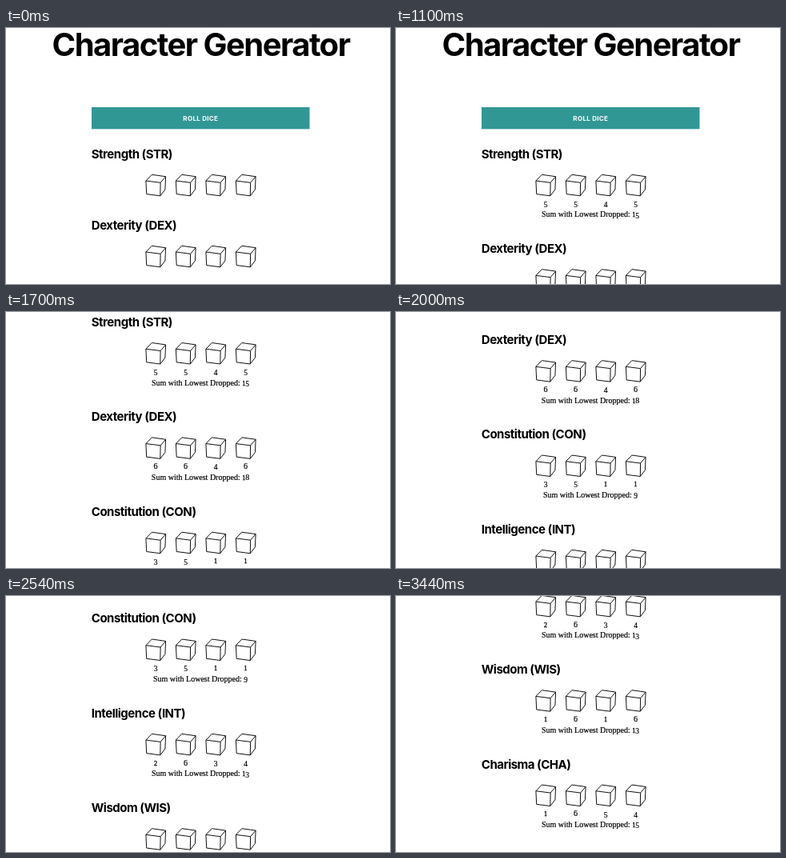
These frames come from a looping animation (480 by 320 pixels, 3500 ms). An HTML page:

```html
<!DOCTYPE html>
<html lang="en">
<head>
<meta charset="utf-8">
<title>Character Generator</title>
<style>
  html, body { margin: 0; width: 100%; height: 100%; overflow: hidden; background: #f0f0f0; }
  svg { display: block; background: #fff; border-radius: 3px; }
  text { font-family: Inter, sans-serif; font-weight: 700; }
  .title { font-size: 40px; letter-spacing: -.038em; }
  .name { font-size: 15px; letter-spacing: -.033em; }
  .label { font-size: 8px; letter-spacing: .3px; fill: #fff; }
  .serif { font: 10px "Liberation Serif", serif; stroke: #000; stroke-width: .2; }
  .title, .label, .serif { text-anchor: middle; }
  .short { font-size: 8px; stroke-width: .3; }
  .low { font-size: 9.5px; }
  .die { fill: #fff; stroke: #111; stroke-width: 1; stroke-linejoin: round; }
</style>
</head>
<body>
<svg width="480" height="320" viewBox="0 0 480 320">
  <defs>
    <path id="die" class="die" d="M0 8 7.4.3 24.7 2.7 24 18.9 17.9 26.8.8 24.6ZM0 8 18.2 10.3 24.7 2.7M18.2 10.3 17.9 26.8"/>
  </defs>
  <g id="page">
    <text class="title" x="243.5" y="35">Character Generator</text>
    <rect x="107" y="99" width="272.5" height="27.3" fill="#319795"/>
    <text class="label" x="243.3" y="115.6">ROLL DICE</text>
  </g>
</svg>
<script>
const LOOP = 3500, STEP = 60, ROLL_AT = 800;
const abilities = [
  ['Strength (STR)', [5, 5, 4, 5]],
  ['Dexterity (DEX)', [6, 6, 4, 6]],
  ['Constitution (CON)', [3, 5, 1, 1]],
  ['Intelligence (INT)', [2, 6, 3, 4]],
  ['Wisdom (WIS)', [1, 6, 1, 6]],
  ['Charisma (CHA)', [1, 6, 5, 4]]
];
const scrollKeys = [[0, 0], [1100, 0], [1400, 50], [2000, 241], [2540, 366], [2900, 446], [3440, 539]];
const page = document.getElementById('page');

// Old-style figures: short 0-2, descending 3, 4, 5, 7 and 9
const figures = n => String(n).replace(/\d/g, d =>
  d < 3 ? `<tspan class="short">${d}</tspan>` :
  d == 6 || d == 8 ? d : `<tspan class="low" dy="1.2">${d}</tspan>`);

const serif = (x, y, content) => `<text class="serif" x="${x}" y="${y}">${content}</text>`;
const column = i => i * 37.5;

function section([name, rolls]) {
  const sum = rolls.reduce((a, b) => a + b) - Math.min(...rolls);
  const dice = rolls.map((_, i) => `<use href="#die" x="${174.9 + column(i)}" y="183"/>`).join('');
  const values = rolls.map((n, i) => serif(187 + column(i), 222.6, figures(n))).join('');
  return `<g class="section"><text class="name" x="106.8" y="162.8">${name}</text>${dice}
    <g class="result">${values}${serif(243, 236.4, 'Sum with Lowest Dropped: ' + figures(sum))}</g></g>`;
}

page.insertAdjacentHTML('beforeend', abilities.map(section).join(''));
const sections = document.querySelectorAll('.section');
const results = document.querySelectorAll('.result');

function slope(i) {
  const [t0, y0] = scrollKeys[Math.max(i - 1, 0)];
  const [t1, y1] = scrollKeys[Math.min(i + 1, scrollKeys.length - 1)];
  return (y1 - y0) / (t1 - t0);
}

// Smooth cubic curve through the scroll keys
function scrollAt(t) {
  const i = scrollKeys.findIndex(key => key[0] > t);
  if (i < 0) return scrollKeys.at(-1)[1];
  const [t0, y0] = scrollKeys[i - 1], [t1, y1] = scrollKeys[i];
  const d = t1 - t0, s = (t - t0) / d, r = 1 - s;
  const y = y0 * r * r * (1 + 2 * s) + y1 * s * s * (3 - 2 * s)
    + d * s * r * (slope(i - 1) * r - slope(i) * s);
  return Math.max(0, y);
}

function draw(now) {
  const t = Math.max(0, Math.floor((now % LOOP - 20) / STEP) * STEP + 20);
  const rolled = t >= ROLL_AT;
  const pitch = rolled ? 118.35 : 89;
  sections.forEach((el, i) => el.setAttribute('transform', `translate(0 ${i * pitch})`));
  results.forEach(el => el.setAttribute('visibility', rolled ? 'visible' : 'hidden'));
  page.setAttribute('transform', `translate(0 ${-scrollAt(t)})`);
}

const start = performance.now();
function tick() {
  draw(performance.now() - start);
  requestAnimationFrame(tick);
}
tick();
</script>
</body>
</html>
```
